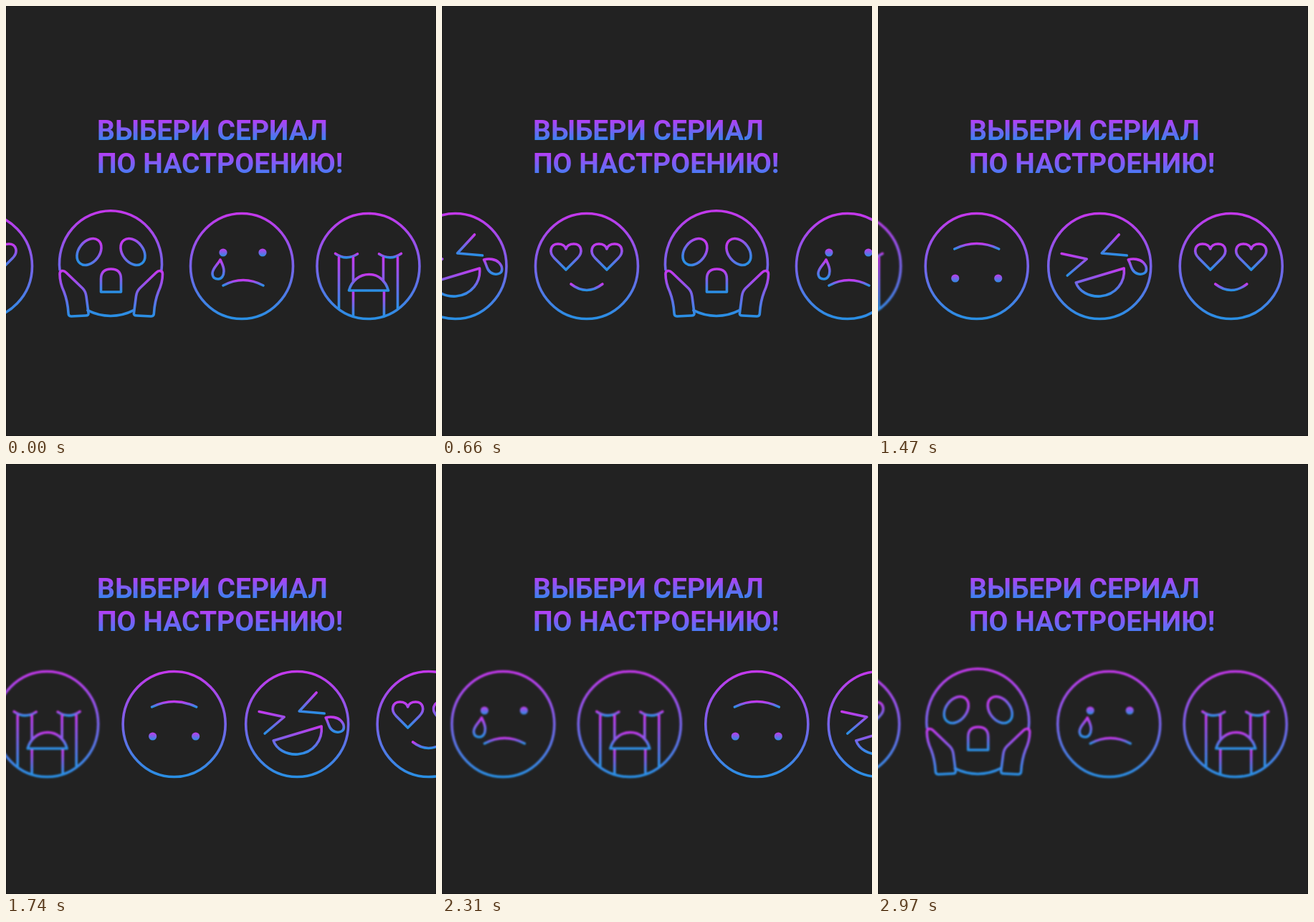
An HTML page for the animation above (3 s loop, 600x600 px).

```html
<!DOCTYPE html>
<html lang="ru">
<head>
<meta charset="utf-8">
<style>
html, body { margin: 0; height: 100%; overflow: hidden; background: #222; }
svg { display: block; width: 600px; height: 600px; }
text { font: 700 39px Roboto, sans-serif; }
.line { fill: none; stroke: url(#ink); stroke-width: 3.6; stroke-linecap: round; stroke-linejoin: round; }
.dot { fill: url(#ink); stroke: none; }
</style>
</head>
<body>
<svg viewBox="0 0 600 600">
  <defs>
    <linearGradient id="ink" x2="0" y2="1">
      <stop stop-color="#c438ec"/><stop offset="1" stop-color="#2a8fe4"/>
    </linearGradient>
    <linearGradient id="row1" gradientUnits="userSpaceOnUse" x1="0" x2="0" y1="158" y2="188">
      <stop stop-color="#b93cf6"/><stop offset="1" stop-color="#3585ee"/>
    </linearGradient>
    <linearGradient id="row2" gradientUnits="userSpaceOnUse" x1="0" x2="0" y1="204" y2="236">
      <stop stop-color="#b93cf6"/><stop offset="1" stop-color="#3f80f4"/>
    </linearGradient>
    <filter id="soft" x="-10%" y="-10%" width="120%" height="120%">
      <feGaussianBlur stdDeviation="0.9"/>
    </filter>
  </defs>
  <rect x=".5" y=".5" width="599" height="599" fill="#222" stroke="#191919"/>
  <text x="127" y="186.5" fill="url(#row1)">ВЫБЕРИ СЕРИАЛ</text>
  <text x="127" y="233.3" fill="url(#row2)">ПО НАСТРОЕНИЮ!</text>
  <g id="strip" class="line"></g>
</svg>
<script>
const path = d => `<path d="${d}"/>`;
const dot = (x, y) => `<circle class="dot" cx="${x}" cy="${y}" r="5.6"/>`;
const flip = (shape, dx = 0) => shape + `<g transform="translate(${dx}) scale(-1 1)">${shape}</g>`;
const head = '<ellipse cy="363" rx="71.5" ry="73.5"/>';

const heart = x => `<g transform="translate(${x})">` + path(
  'M0 368L-16 352C-25 343 -21 332 -11 332C-5 332 -1 335 0 339C1 335 5 332 11 332C21 332 25 343 16 352Z') + '</g>';

const faces = {
  sob: head
    + flip(path('M-46 345.5Q-31 356 -15 346') + path('M-41 351V422M-21 351V384') )
    + path('M-21 399V432M22 399V432')
    + path('M-27 397C-23 383 -12 374.5 1 374.5C14 374.5 24 383 28 397Z'),
  tear: head + dot(-26, 344) + dot(29, 344)
    + path('M-30 354C-33 360 -41 366 -41 373C-41 379 -37 381 -33 381C-28 381 -25 376 -25 370C-25 363 -28 359 -30 354Z')
    + path('M-26 390Q2 375 30 390'),
  scream: path('M-71 368A71.5 73.5 0 1 1 71 368M-32 424.7A71.5 73.5 0 0 0 32 424.7')
    + flip('<ellipse rx="14.5" ry="20.5" transform="translate(-30 343) rotate(38)"/>', 1)
    + path('M-13.5 399V381Q-13.5 367 .5 367Q14.5 367 14.5 381V399Z')
    + flip(path('M-71 374C-71 369 -66 368 -62 372L-39 394Q-35 398 -34 405L-31 428Q-30 432 -35 432' +
      'L-55 433Q-59 433 -59 428Q-60 412 -65 399Q-71 386 -71 374Z'), 1.5),
  love: head + heart(-29) + heart(28) + path('M-22 388Q0 405 22 388'),
  laugh: head + path('M-53 345.5L-18 353L-45 376') + path('M27 319L3 345L38 348')
    + path('M-33 386L34 366C36 385 23 403 1 405C-15 406 -29 398 -33 386Z')
    + path('M40 354C47 352 56 353 61 358C67 364 66 371 62 373C56 376 49 373 46 368C43 363 43 359 40 354Z'),
  upside: head + path('M-31 339Q0 324 31 339') + dot(-30, 380) + dot(30, 380)
};

const LOOP = 3000, STEP = 30, SPEED = 0.359, SPAN = 1073;
const start = { sob: 505.5, tear: 329, scream: 146, love: -35, laugh: -218.5, upside: -390 };
const row = Object.keys(start)
  .map(k => `<g transform="translate(${start[k]})">${faces[k]}</g>`).join('');
const strip = document.getElementById('strip');
strip.innerHTML = row + `<g transform="translate(${-SPAN})" filter="url(#soft)">${row}</g>`;

const t0 = performance.now();
function draw() {
  const t = (performance.now() - t0) % LOOP;
  strip.setAttribute('transform', `translate(${Math.floor(t / STEP) * STEP * SPEED})`);
  requestAnimationFrame(draw);
}
draw();
</script>
</body>
</html>
```
